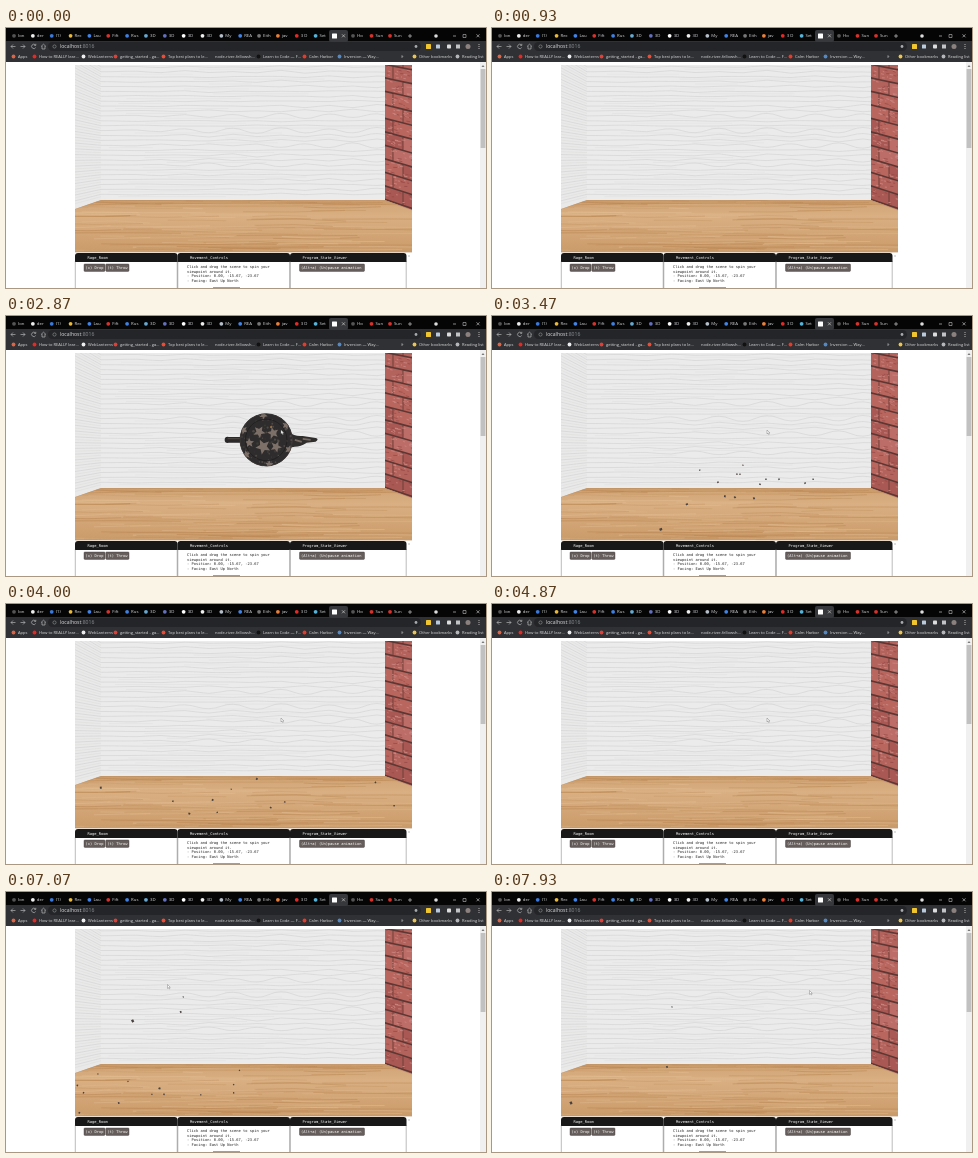
An HTML page that plays this animation: 480 px wide and 260 px high, repeating every 8 s.

```html
<!DOCTYPE html>
<html>
<head>
<meta charset="utf-8">
<style>
html, body { margin: 0; width: 100%; height: 100%; overflow: hidden; background: #fff; }
svg { display: block; width: 480px; height: 260px; }
.ui { font-family: "Open Sans", Roboto, sans-serif; fill: #dcdddf; }
.mono { font-family: "DejaVu Sans Mono", monospace; font-size: 3.73px; }
</style>
</head>
<body>
<svg id="stage" viewBox="0 0 480 260" xmlns="http://www.w3.org/2000/svg">
  <defs>
    <linearGradient id="wood" x2="0" y2="1">
      <stop offset="0" stop-color="#cfa273"/><stop offset=".3" stop-color="#d9b083"/>
      <stop offset=".65" stop-color="#d2a576"/><stop offset="1" stop-color="#c99a69"/>
    </linearGradient>
    <clipPath id="room"><rect x="69" y="37" width="337" height="187.5"/></clipPath>
    <clipPath id="brickWall"><path d="M379 37H406V182L379 173Z"/></clipPath>
    <clipPath id="floorArea"><path d="M95 172H379L406 182V224.500H69V181Z"/></clipPath>
    <clipPath id="potBody"><circle r="27"/></clipPath>
  </defs>
  <rect width="480" height="260" fill="#fff"/>
  <g id="browser" class="ui"></g>
  <g clip-path="url(#room)">
    <rect x="69" y="37" width="337" height="188" fill="#ebebeb"/>
    <path d="M69 37H95V172L69 181Z" fill="#e9e9e9"/>
    <g id="wall" fill="none"></g>
    <g id="bricks" clip-path="url(#brickWall)"></g>
    <g id="floor" clip-path="url(#floorArea)"></g>
    <g id="pot"></g>
    <g id="shards"></g>
  </g>
  <g id="panels" class="mono"></g>
  <path id="cursor" d="M0 0V3.900L.9 3.100L1.600 4.500L2.300 4.200L1.700 2.800H2.800Z" fill="#fff" stroke="#777" stroke-width=".45"/>
</svg>
<script>
const NS = 'http://www.w3.org/2000/svg';
const $ = id => document.getElementById(id);

function add(parent, tag, attrs, text) {
  const el = document.createElementNS(NS, tag);
  for (const key in attrs) el.setAttribute(key, attrs[key]);
  if (text) el.textContent = text;
  parent.appendChild(el);
  return el;
}
const rect = (g, x, y, width, height, fill, rx = 0) => add(g, 'rect', { x, y, width, height, fill, rx });
const dot = (g, cx, cy, r, fill) => add(g, 'circle', { cx, cy, r, fill });
const line = (g, d, stroke, width) => add(g, 'path', { d, stroke, fill: 'none', 'stroke-width': width });
const label = (g, x, y, text, attrs = {}) => add(g, 'text', { x, y, ...attrs }, text);

function seeded(seed) {
  return () => (seed = (seed * 16807) % 2147483647) / 2147483647;
}

function drawBrowser() {
  const g = $('browser');
  rect(g, 0, 0, 480, 13, '#050506');
  rect(g, 0, 13, 480, 21, '#303134');
  rect(g, 323, 2, 19, 12, '#37383b', 2);
  rect(g, 42, 14, 373, 9, '#242528', 4.5);

  const tabs = '(on,der,(1),Rec,Lau,Fift,Rus,3D,3D,3D,3D,My,REA,Eith,jav,3 D,Set'.split(',');
  const hues = ['#555', '#eee', '#3b79dc', '#e9b83c', '#4285e8', '#d8322c', '#3f81e0', '#68a9d0', '#6470bd',
    '#fff', '#eee', '#b6bec8', '#4285e8', '#777', '#e9813b', '#e22b27', '#55b4d8'];
  const tab = (x, name, hue) => {
    dot(g, x, 7.8, 1.9, hue);
    label(g, x + 4, 9.4, name, { 'font-size': 4.3 });
  };
  tabs.forEach((name, i) => tab(8 + i * 18.85, name, hues[i]));
  rect(g, 326, 5.5, 5, 5, '#fff', .5);
  tab(347, 'Ho', '#555');
  tab(365.500, 'Sun', '#d8322c');
  tab(384, 'Sun', '#d8322c');
  line(g, 'M336 6.300l3 3m0-3l-3 3M402 8h4m-2-2v4M447 8h3M470.500 6.300l3 3m0-3l-3 3', '#ddd', .6);
  dot(g, 430, 8, 1.8, '#ddd');
  line(g, 'M457 6.500h3v3h-3z', '#ddd', .5);

  line(g, 'M9.500 18.500H5m2-2l-2 2l2 2M14.500 18.500h4.500m-2-2l2 2l-2 2M29.500 17a2.200 2.200 0 1 0 .2 2.500M29.800 15.800v1.600h-1.600M35 18.500l2.500-2.300l2.500 2.300M36 18v3h3v-3', '#c5c6c8', .6);
  add(g, 'circle', { cx: 48.500, cy: 18.500, r: 1.6, fill: 'none', stroke: '#aaa', 'stroke-width': .5 });
  const url = label(g, 54, 20.3, '', { 'font-size': 5.1 });
  add(url, 'tspan', {}, 'localhost');
  add(url, 'tspan', { fill: '#8b9095' }, ':8016');
  dot(g, 410, 18.500, 1.4, '#a8aaad');
  rect(g, 420, 16, 5, 5, '#f1c52e', .6);
  rect(g, 430, 16.500, 4, 4, '#b9cadc', .6);
  rect(g, 441, 16.500, 4, 4, '#ddd', .8);
  rect(g, 450, 16.500, 4, 4, '#c2c3c5');
  dot(g, 462, 18.500, 2.5, '#8b8280');
  for (const y of [16.5, 18.5, 20.5]) dot(g, 473, y, .5, '#ddd');

  const marks = [
    [12, 'Apps', '#dd6545'], [33, 'How to REALLY lear…', '#e22b27'], [82, 'WebLanterns', '#eee'],
    [114, 'getting_started - ga…', '#e03f37'], [162, 'Top best plans to le…', '#ef4b34'],
    [209, 'node-river-fellowsh…', ''], [257, 'Learn to Code — F…', '#111'],
    [303, 'Calm Harbor', '#e23c2f'], [338, 'Inversion — Way…', '#5489c5'],
    [413, 'Other bookmarks', '#e9c45b'], [456, 'Reading list', '#b4b6b9']
  ];
  for (const [x, name, hue] of marks) {
    if (hue) dot(g, x - 4.5, 28.5, 1.9, hue);
    label(g, x, 30, name, { 'font-size': 4.05 });
  }
  label(g, 395, 30, '»', { 'font-size': 5 });

  rect(g, 474, 34, 6, 226, '#f0f0f0');
  rect(g, 474.6, 41, 4.8, 79, '#c1c1c1');
  add(g, 'path', { d: 'M475.500 39l1.500-2l1.500 2z', fill: '#777' });
}

// Planks run back along the side wall toward the vanishing point, then across.
function drawWall() {
  const g = $('wall'), rnd = seeded(41);
  const side = y => 130 + (y - 130) * 1.18;
  for (let y = 34; y < 171; y += 4.9) {
    let d = `M69 ${side(y)}L95 ${y}`;
    for (let x = 119; x <= 383; x += 24) d += `T${x} ${(y + (rnd() - .5) * 1.2).toFixed(2)}`;
    line(g, d.replace('T', 'Q107 ' + y + ' '), '#cbcbca', .5);
    line(g, `M69 ${side(y + 2.4)}L95 ${y + 2.4}`, '#d6d6d5', .4);
    line(g, `M${100 + rnd() * 120} ${y + 2.4}h${40 + rnd() * 110}`, '#dcdcdb', .4);
  }
}

function drawBricks() {
  const g = $('bricks'), rnd = seeded(77);
  const at = (x, y) => `${x} ${(y + (x - 379) * (.2 + (y - 37) * .001)).toFixed(2)}`;
  rect(g, 379, 37, 27, 146, '#5c3733');
  const tones = ['#b4625c', '#bd6d67', '#aa5853', '#b9665f'];
  let row = 0;
  for (let y = 23; y < 176; y += 13.5, row++) {
    const joints = row % 2 ? [372, 387, 412] : [374, 397, 418];
    for (let i = 0; i < 2; i++) {
      const a = joints[i] + .4, b = joints[i + 1] - .4;
      add(g, 'path', {
        d: `M${at(a, y + .7)}L${at(b, y + .7)}L${at(b, y + 12.6)}L${at(a, y + 12.6)}Z`,
        fill: tones[Math.floor(rnd() * 4)]
      });
    }
    for (let i = 0; i < 16; i++) {
      const x = 379 + rnd() * 26;
      line(g, `M${at(x, y + 1.5 + rnd() * 10)}l${1 + rnd() * 3} ${rnd()}`, rnd() < .6 ? '#cd8a83' : '#984b47', .8);
    }
  }
}

function drawFloor() {
  const g = $('floor'), rnd = seeded(19);
  rect(g, 69, 172, 337, 53, 'url(#wood)');
  for (let i = 0; i < 90; i++) {
    const y = 173 + 51 * rnd(), x = 30 + rnd() * 300, w = 50 + rnd() * 130, bend = (rnd() - .5) * 5;
    const grain = line(g, `M${x} ${y}q${w / 2} ${bend} ${w} ${(rnd() - .5) * 3}`, rnd() < .55 ? '#b98551' : '#e2bd92', .4 + rnd() * .7);
    grain.setAttribute('opacity', .5);
  }
  line(g, 'M69 181L95 172.300H379L406 182', '#b98f63', .5);
}

function drawPanels() {
  const g = $('panels');
  const panel = (x, w, title) => {
    add(g, 'path', { d: `M${x} 234v-6q0-3 3-3h${w - 6}q3 0 3 3v6z`, fill: '#181819' });
    line(g, `M${x + .3} 233V260M${x + w - .3} 233V260`, '#555', .4);
    label(g, x + 12.5, 231.3, title, { fill: '#fff' });
  };
  const button = (x, w, text) => {
    add(g, 'rect', { x, y: 236, width: w, height: 7.4, rx: .8, fill: '#665e5c', stroke: '#393534', 'stroke-width': .4 });
    label(g, x + 1.5, 241, text, { fill: '#fff' });
  };
  panel(69, 102.5, 'Rage_Room');
  panel(171.5, 112.5, 'Movement_Controls');
  panel(284, 116.5, 'Program_State_Viewer');
  button(78, 21, '(x) Drop');
  button(99.8, 23.2, '(t) Throw');
  button(293.5, 65, '(Alt+a) (Un)pause animation');
  ['Click and drag the scene to spin your', 'viewpoint around it.', '- Position: 0.00, -15.67, -23.67', '- Facing: East Up North']
    .forEach((text, i) => label(g, 181, 240.2 + i * 4.55, text, { fill: '#222' }));
  rect(g, 207, 259.4, 27, .6, '#665e5c');
  rect(g, 402.5, 227, 1, 2, '#bbb');
}

function drawPot() {
  const g = $('pot'), rnd = seeded(8);
  add(g, 'path', { d: 'M-24-3H-38q-4-.5-4 3q0 3.500 4 3H-24z', fill: '#2b2829' });
  line(g, 'M-39-1.200h13', '#5d5551', .8);
  add(g, 'path', { d: 'M23-8q6 5 14 4l13 2q4 1 0 4l-9 1q-6 4-12 4l-6 1z', fill: '#302d2d' });
  line(g, 'M29 0l7 2M37-1l8 1', '#75695f', 1.8);
  const body = add(g, 'g', { 'clip-path': 'url(#potBody)' });
  dot(body, 0, 0, 27, '#2e2c2c');
  for (let i = 0; i < 90; i++) {
    const a = rnd() * 6.28, r = 27 * Math.sqrt(rnd());
    dot(body, r * Math.cos(a), r * Math.sin(a), .4 + rnd() * .9, rnd() < .5 ? '#4f4946' : '#3d3938');
  }
  const star = (x, y, size, turn) => {
    let d = '';
    for (let i = 0; i < 10; i++) {
      const a = turn + i * Math.PI / 5, r = i % 2 ? size * .45 : size;
      d += `${i ? 'L' : 'M'}${x + r * Math.cos(a)} ${y + r * Math.sin(a)}`;
    }
    add(body, 'path', { d: d + 'Z', fill: '#7d7068' });
  };
  star(-7, -8, 6.5, .2);
  star(7, -7, 6, .7);
  star(-3, 7, 8, .5);
  star(10, 7, 6, .1);
  star(-17, 3, 5, .9);
  for (let i = 0; i < 6; i++) star(25 * Math.cos(i * 1.05 + .4), 25 * Math.sin(i * 1.05 + .4), 4.5, i);
  add(body, 'circle', { r: 21, fill: 'none', stroke: '#211f20', 'stroke-width': .9 });
  add(body, 'circle', { r: 26.6, fill: 'none', stroke: '#464140', 'stroke-width': .8 });
  dot(body, 5, -13, 1.1, '#a5733d');
}

// Each throw: start time, aim point, offset of the pot from it at full size.
const FLIGHT = .2;
const throws = [
  { start: 2.87, aim: [275, 115], off: [-15, 9], shards: [] },
  { start: 6.27, aim: [162, 94], off: [41, 25], shards: [] }
];
const potPose = (shot, dt) => {
  const s = 1 / (1 + 11.5 * dt);
  return { x: shot.aim[0] + shot.off[0] * s, y: shot.aim[1] + shot.off[1] * s, s };
};

function makeShards() {
  const rnd = seeded(5);
  const shard = (shot, x, y, life, rest) => {
    const size = .8 + Math.max(0, y - 150) / 70;
    const el = add($('shards'), 'path', {
      d: `M${-size} ${-size * .5}L${size * .3} ${-size}L${size} ${size * .3}L${-size * .2} ${size}Z`, fill: '#49413f'
    });
    shot.shards.push({ el, x, y, life, rest, ground: Math.max(y + 3, 178 + rnd() * 44), spin: 200 + rnd() * 500 });
  };
  [[208, 154], [226, 166], [251, 149], [245, 158], [248, 158], [195, 188], [169, 213], [233, 180],
    [243, 181], [262, 182], [268, 168], [274, 163], [287, 163], [313, 167], [321, 163]]
    .forEach(([x, y]) => shard(throws[0], x, y, .8 + rnd() * .7));
  for (let i = 0; i < 13; i++) shard(throws[1], 85 + rnd() * 150, 138 + rnd() * 50, .7 + rnd() * .6);
  [[180, 115], [175, 175], [79, 211]].forEach(([x, y]) => shard(throws[1], x, y, 2, true));
}

const GRAVITY = 350, SPREAD = .4;
function moveShard(p, from, dt) {
  const on = dt >= 0 && dt < p.life;
  p.el.setAttribute('display', on ? 'inline' : 'none');
  if (!on) return;
  const u = p.rest ? Math.min(1, dt / 1.2) : dt / SPREAD;
  const x = from.x + (p.x - from.x) * u;
  let y;
  if (p.rest) {
    y = from.y + (p.y - from.y) * u * u;
  } else {
    const vy = (p.y - from.y - GRAVITY * SPREAD * SPREAD / 2) / SPREAD;
    y = from.y + vy * dt + GRAVITY * dt * dt / 2;
    if (y > p.ground) y = p.ground - Math.min(10, (y - p.ground) * .15);
  }
  p.el.setAttribute('transform', `translate(${x} ${y}) rotate(${p.rest ? 0 : p.spin * dt})`);
}

const route = [[2.4, 290, 180], [2.53, 275, 114], [5.47, 275, 114], [6.13, 161.5, 92.5], [7.13, 161.5, 92.5], [7.65, 317.5, 98.5]];
function moveCursor(t) {
  const el = $('cursor');
  el.setAttribute('display', t < route[0][0] ? 'none' : 'inline');
  let i = 0;
  while (i < route.length - 2 && t > route[i + 1][0]) i++;
  const [a, b] = [route[i], route[i + 1]];
  const k = Math.max(0, Math.min(1, (t - a[0]) / (b[0] - a[0])));
  const e = k * k * (3 - 2 * k);
  el.setAttribute('transform', `translate(${a[1] + (b[1] - a[1]) * e} ${a[2] + (b[2] - a[2]) * e})`);
}

function render(t) {
  const active = throws.find(shot => t >= shot.start && t < shot.start + FLIGHT);
  $('pot').setAttribute('display', active ? 'inline' : 'none');
  if (active) {
    const { x, y, s } = potPose(active, t - active.start);
    $('pot').setAttribute('transform', `translate(${x} ${y}) scale(${s})`);
  }
  for (const shot of throws) {
    const from = potPose(shot, FLIGHT);
    for (const p of shot.shards) moveShard(p, from, t - shot.start - FLIGHT);
  }
  moveCursor(t);
}

[drawBrowser, drawWall, drawBricks, drawFloor, drawPanels, drawPot, makeShards].forEach(draw => draw());
const began = performance.now();
function tick() {
  render((performance.now() - began) % 8000 / 1000);
  requestAnimationFrame(tick);
}
tick();
</script>
</body>
</html>
```
